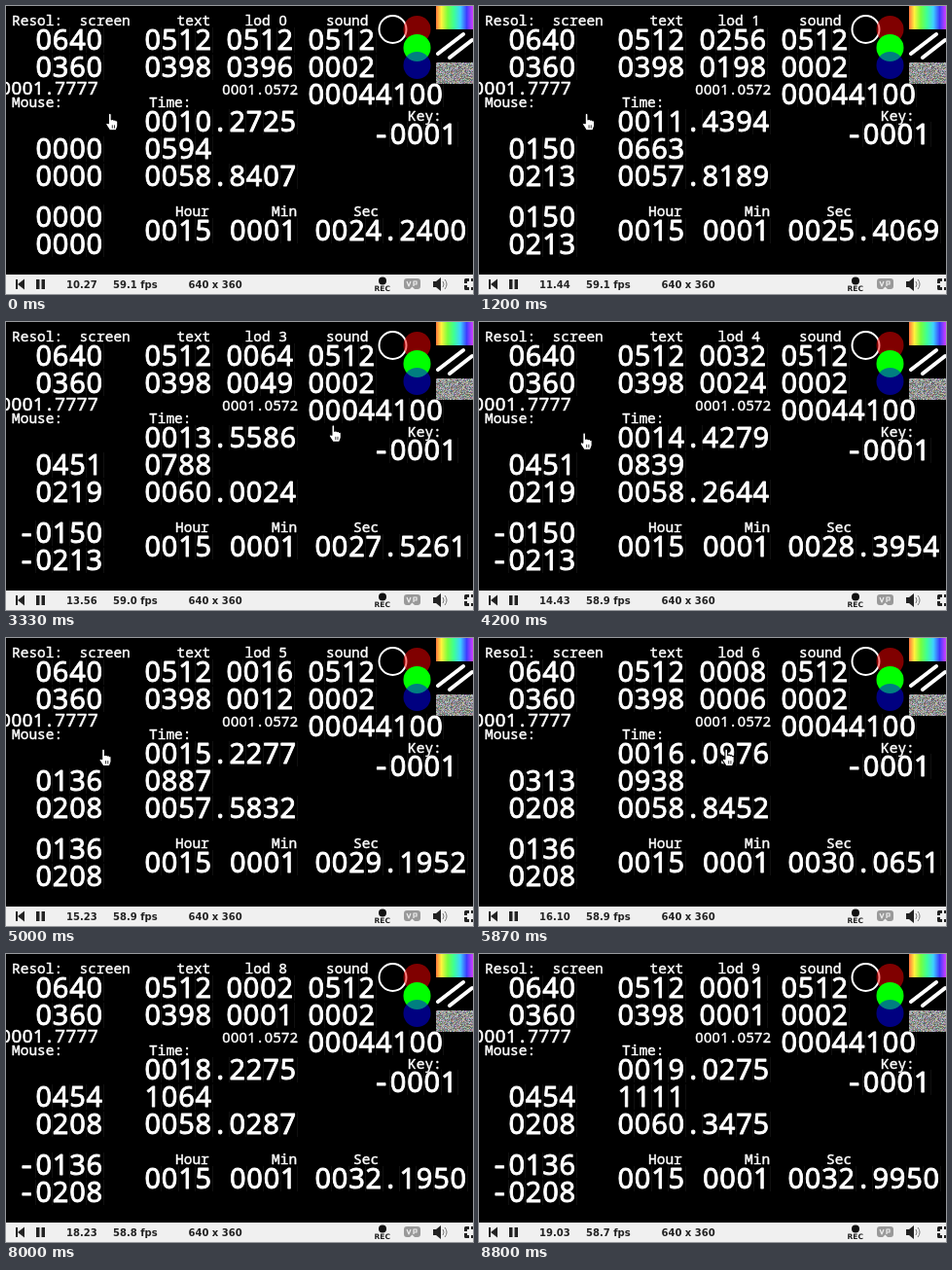
An HTML page with a canvas for the animation above (8.87 s loop, 480x296 px).

```html
<!DOCTYPE html>
<html lang="en">
<head>
<meta charset="utf-8">
<title>Shader inputs</title>
<style>
  html, body { margin: 0; width: 100%; height: 100%; overflow: hidden; background: #000; }
  canvas { display: block; }
</style>
</head>
<body>
<canvas id="stage" width="480" height="296"></canvas>
<script>
const LOOP = 8870, STEP = 200 / 3;
const COLUMN = { mouse: 30, text: 142, lod: 226, sound: 310 };
const PITCH = 17.4;

// Pointer moves on the 640 x 360 screen, y pointing up
const START = { x: 145, y: 213 };
const MOVES = [
  { from: 0, to: 600, x: 150, y: 213 },
  { from: 1250, to: 2100, x: 451, y: 219 },
  { from: 3400, to: 4300, x: 136, y: 208 },
  { from: 5452, to: 6150, x: 454, y: 208 },
  { from: 7170, to: 7950, x: 653, y: 390 }
];
const DRAGS = [{ press: 1000, release: 2200 }, { press: 4500, release: 7210 }];
const MOUSE_LAG = 42;

const stage = document.getElementById('stage');
const backdrop = document.createElement('canvas');
backdrop.width = 480;
backdrop.height = 296;
let g = backdrop.getContext('2d');

const clamp01 = u => Math.min(1, Math.max(0, u));
const smooth = u => u * u * (3 - 2 * u);
const int = v => (v < 0 ? '-' : '') + String(Math.abs(v)).padStart(4, '0');
const float = v => v.toFixed(4).padStart(9, '0');

function seeded(seed) {
  return () => (seed = seed * 16807 % 2147483647) / 2147483647;
}

function pointerAt(t) {
  return MOVES.reduce((p, m) => {
    const s = smooth(clamp01((t - m.from) / (m.to - m.from)));
    return { x: p.x + (m.x - p.x) * s, y: p.y + (m.y - p.y) * s };
  }, START);
}

function mouseAt(t) {
  const p = pointerAt(t - MOUSE_LAG);
  return [Math.round(p.x), Math.round(p.y)];
}

function mouseState(t) {
  const drag = DRAGS.filter(d => t >= d.press).pop();
  if (!drag) return [0, 0, 0, 0];
  const sign = t < drag.release ? 1 : -1;
  return [...mouseAt(Math.min(t, drag.release)), ...mouseAt(drag.press).map(v => v * sign)];
}

// Fixed-pitch text with plain zeros, slightly emboldened
function mono(text, x, y, size) {
  const pitch = size * 0.6;
  g.fillStyle = g.strokeStyle = '#fff';
  g.lineWidth = size * 0.03;
  g.lineJoin = 'round';
  g.textAlign = 'center';
  [...text].forEach((c, i) => {
    const family = /\d/.test(c) ? '"Noto Sans", sans-serif' : '"Noto Sans Mono", monospace';
    g.font = `${size}px ${family}`;
    const cx = x + (i + 0.5) * pitch;
    g.fillText(c, cx, y);
    g.strokeText(c, cx, y);
  });
}

const label = (text, x, y) => mono(text, x, y, 14.5);

// Large number on a line grid, with faint cell edges
function big(text, x, row) {
  const y = 45 + row * 28;
  for (let i = 1; i <= text.length; i++) rect('#101010', Math.round(x + i * PITCH), y - 23, 1, 26);
  mono(text, x, y, PITCH / 0.6);
}

function rect(color, x, y, w, h) {
  g.fillStyle = color;
  g.fillRect(x, y, w, h);
}

function disc(color, x, y, r) {
  g.fillStyle = color;
  g.beginPath();
  g.arc(x, y, r, 0, 7);
  g.fill();
}

function shape(path, fill, stroke, width = 1) {
  const p = new Path2D(path);
  if (fill) { g.fillStyle = fill; g.fill(p); }
  if (stroke) { g.strokeStyle = stroke; g.lineWidth = width; g.stroke(p); }
}

function barText(text, x, y = 290, size = 10) {
  g.textAlign = 'left';
  g.font = `bold ${size}px "DejaVu Sans", sans-serif`;
  g.fillStyle = '#222';
  g.fillText(text, x, y);
}

function drawThumbnails() {
  g.strokeStyle = '#fff';
  g.lineWidth = 2;
  g.beginPath();
  g.arc(397.5, 24, 14, 0, 7);
  g.stroke();

  disc('rgba(255,0,0,.5)', 422.5, 24, 14);
  disc('#0f0', 422.5, 43, 14);
  disc('rgba(0,0,255,.5)', 422.5, 61, 14);

  const rainbow = g.createLinearGradient(441, 0, 480, 0);
  for (let i = 0; i <= 6; i++) rainbow.addColorStop(i / 6, `hsl(${10 + i * 46}, 100%, 62%)`);
  rect(rainbow, 442, 0, 38, 24);

  g.lineCap = 'round';
  shape('M444 49L470 29M456 53L479 35', null, '#fff', 4);
  g.lineCap = 'butt';

  const random = seeded(7);
  for (let y = 58; y < 80; y++) {
    for (let x = 442; x < 480; x++) {
      const gray = 70 + random() * 90;
      const channel = () => Math.floor(gray + random() * 60);
      rect(`rgb(${channel()},${channel()},${channel()})`, x, y, 1, 1);
    }
  }
}

function drawBar() {
  rect('#f0f0f0', 0, 276, 480, 20);
  rect('#222', 10, 281, 2, 10);
  shape('M19 280.5V291.5L12 286Z', '#222');
  rect('#222', 31, 281, 3.5, 10);
  rect('#222', 36.5, 281, 3.5, 10);
  barText('640 x 360', 187.5);
  disc('#111', 387, 282.5, 4);
  barText('REC', 378.5, 293, 7.5);
  shape('M412 280H423Q426 280 426 283V288Q426 291 423 291H420L417.5 288.5L415 291H412Q409 291 409 288V283Q409 280 412 280Z', '#999');
  shape('M412 283L414 288L416 283M419 288V283H422V286H419', null, '#eee', 1.2);
  shape('M439 283H442L447 279V293L442 289H439Z', '#222');
  shape('M449 283Q451 286 449 289M451 281Q455 286 451 291', null, '#777');
  shape('M472.5 285V281.5H476M478 281.5H482M472.5 287V290.5H476M478 290.5H482', null, '#222', 3);
}

function drawStatic() {
  rect('#000', 0, 0, 480, 296);
  label('Resol:  screen', 6, 20);
  label('text', 175.5, 20);
  label('sound', 329, 20);
  label('Mouse:', 6, 104);
  label('Time:', 147, 104);
  label('Key:', 413, 118);
  label('Hour', 174, 216);
  label('Min', 273, 216);
  label('Sec', 357, 216);

  ['0640', '0360'].forEach((v, i) => big(v, COLUMN.mouse, i));
  ['0512', '0398'].forEach((v, i) => big(v, COLUMN.text, i));
  ['0512', '0002', '00044100'].forEach((v, i) => big(v, COLUMN.sound, i));
  big('-0001', 377, 3.46);
  big('0015', COLUMN.text, 7);
  big('0001', 229.5, 7);
  mono('0001.7777', -6, 91, 18.7);
  label('0001.0572', 222, 91);
  drawThumbnails();
  drawBar();
}

function drawHand({ x, y }) {
  g.save();
  g.translate(x * 0.75, (360 - y) * 0.75);
  g.scale(1.1, 1.1);
  shape('M-3 1Q-2 -1 -.5 1V6Q1 5 2 6.3Q3.5 5.6 4 7Q5.5 6.5 5.5 8V12L4 16H-2L-5.5 10.5Q-5.5 8.5 -3 9.5Z', '#fff', '#000');
  shape('M.5 11V14M2.5 11V14', null, '#000', 0.7);
  g.restore();
}

function draw(ms) {
  const n = Math.floor((Math.floor(ms / 10) * 10 + 3.5) / STEP);
  const t = Math.round(n * STEP / 10) * 10;
  const elapsed = t / 1000 - 0.045 * (1 - Math.exp(-t / 900));
  const time = 10.2725 + elapsed;
  const random = seeded(n * 7919 + 11);
  random();
  const rate = 57.5 + random() * 3;
  const lod = Math.floor(time) % 10;

  g.drawImage(backdrop, 0, 0);
  label('lod ' + lod, 245.5, 20);
  [512, 396].forEach((size, i) => big(int(Math.max(1, size >> lod)), COLUMN.lod, i));
  big(float(time), COLUMN.text, 3);
  big(int(Math.round(594 + elapsed * 59.05)), COLUMN.text, 4);
  big(float(rate), COLUMN.text, 5);
  big(float(time + 13.9675), 317, 7);

  mouseState(t).forEach((v, i) => {
    const row = i < 2 ? 4 + i : 4.5 + i;
    big(int(v), COLUMN.mouse - (v < 0 ? PITCH : 0), row);
  });

  barText(time.toFixed(2), 62);
  barText((59.15 - 0.05 * lod).toFixed(1) + ' fps', 110);
  if (t < 7950) drawHand(pointerAt(t));
}

drawStatic();
g = stage.getContext('2d');

function tick() {
  draw(performance.now() % LOOP);
  requestAnimationFrame(tick);
}
tick();
</script>
</body>
</html>
```
